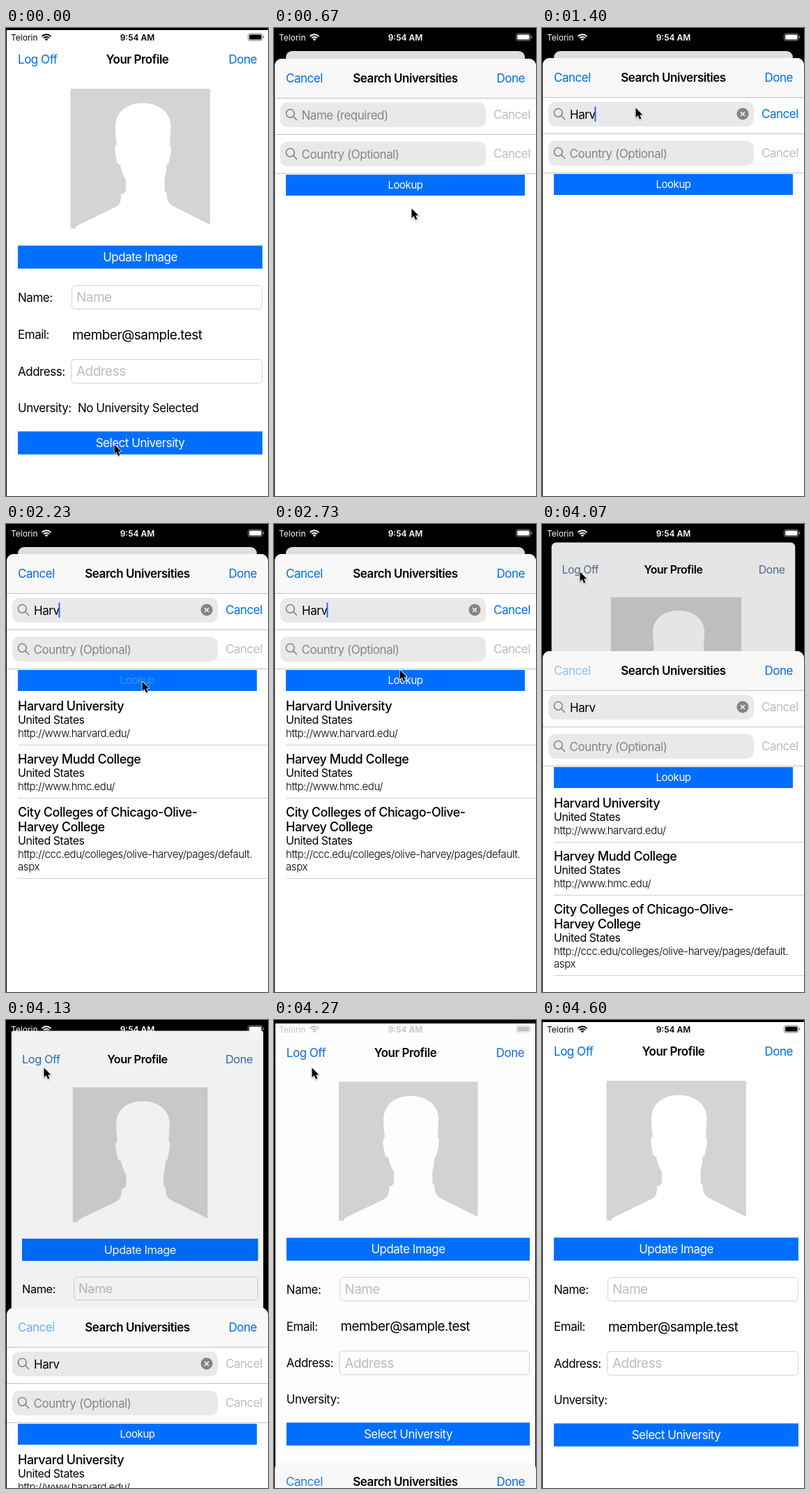
Animation of 376x670 px, one loop 4830 ms. Source, as an HTML page with a canvas:

```html
<!DOCTYPE html>
<html lang="en">
<head>
<meta charset="utf-8">
<title>University search</title>
<style>
  html, body { margin: 0; width: 100%; height: 100%; overflow: hidden; background: #000; }
  canvas { display: block; width: 376px; height: 670px; }
</style>
</head>
<body>
<canvas id="stage"></canvas>
<script>
const W = 376, H = 670, LOOP = 4830;
const FONT = 'Inter, Roboto, sans-serif';
const BLUE = '#006fff', LINK = '#006ce6', HINT = '#85858a', OFF = '#bcbcbe';

const canvas = document.getElementById('stage');
const ctx = canvas.getContext('2d');
const dpr = window.devicePixelRatio || 1;
canvas.width = W * dpr;
canvas.height = H * dpr;

const clamp = v => Math.max(0, Math.min(1, v));
const ramp = (t, a, b) => clamp((t - a) / (b - a));
const smooth = v => v * v * (3 - 2 * v);
const mix = (a, b, k) => a + (b - a) * k;

// Critically damped spring, 0 to 1
function spring(ms) {
  const u = Math.max(0, ms) * 0.01826;
  return 1 - (1 + u) * Math.exp(-u);
}

// y is the middle of the capital letters
function text(str, x, y, { size = 17, weight = 400, color = '#000', align = 'left', track = -0.028, alpha = 1 } = {}) {
  ctx.save();
  ctx.font = `${weight} ${size}px ${FONT}`;
  ctx.letterSpacing = `${track * size}px`;
  ctx.textAlign = align;
  ctx.fillStyle = color;
  ctx.globalAlpha *= alpha;
  ctx.fillText(str, x, y + size * 0.364);
  const width = ctx.measureText(str).width;
  ctx.restore();
  return width;
}

function box(x, y, w, h, color) {
  ctx.fillStyle = color;
  ctx.fillRect(x, y, w, h);
}

function rounded(x, y, w, h, r) {
  ctx.beginPath();
  ctx.roundRect(x, y, w, h, r);
}

function button(label, x, y, w, h, size, alpha = 1) {
  box(x, y, w, h, BLUE);
  text(label, x + w / 2, y + h / 2, { size, color: '#fff', align: 'center', alpha });
}

function input(hint, x, y, w, h) {
  rounded(x + 0.5, y + 0.5, w - 1, h - 1, 5);
  ctx.lineWidth = 1;
  ctx.strokeStyle = '#d2d2d2';
  ctx.stroke();
  text(hint, 101, y + h / 2, { size: 19, color: '#bdbdc0' });
}

function portrait() {
  box(92.5, 87, 200.5, 200, '#d4d4d4');
  ctx.fillStyle = '#fff';
  ctx.beginPath();
  ctx.moveTo(99, 287.5);
  ctx.quadraticCurveTo(100, 284, 106, 281);
  ctx.lineTo(158, 256);
  ctx.quadraticCurveTo(166, 252, 165, 238);
  ctx.quadraticCurveTo(172, 237, 172, 231);
  ctx.lineTo(172, 217);
  ctx.quadraticCurveTo(166, 207, 164, 196);
  ctx.quadraticCurveTo(159, 196, 158, 186);
  ctx.quadraticCurveTo(154, 169, 159, 167);
  ctx.quadraticCurveTo(157, 152, 157, 140);
  ctx.bezierCurveTo(158, 120, 173, 107.5, 197, 107.5);
  ctx.bezierCurveTo(221, 107.5, 236, 122, 236.5, 140);
  ctx.lineTo(235, 167);
  ctx.quadraticCurveTo(239, 169, 235, 186);
  ctx.quadraticCurveTo(234, 195, 230.5, 196);
  ctx.quadraticCurveTo(230, 208, 227.5, 216);
  ctx.lineTo(227.5, 233);
  ctx.quadraticCurveTo(231.5, 236, 231, 243);
  ctx.quadraticCurveTo(232, 251, 240, 255);
  ctx.lineTo(293.5, 282);
  ctx.lineTo(293.5, 287.5);
  ctx.fill();
}

function profile(depth, university) {
  ctx.save();
  const s = (375 - 32 * depth) / 375;
  ctx.translate(1 + 16 * depth, 3 + 30 * depth);
  ctx.scale(s, s);
  ctx.translate(-1, -3);
  rounded(1, 3, 375, 700, 10 * depth);
  ctx.clip();
  box(1, 3, 375, 700, '#fff');

  // Links lose their tint while the card is behind the sheet
  const color = `rgb(${mix(0, 119, depth)},${mix(108, 119, depth)},${mix(230, 124, depth)})`;
  text('Log Off', 17, 45, { color });
  text('Your Profile', 188.5, 45, { weight: 600, align: 'center' });
  text('Done', 360, 45, { color, align: 'right' });
  portrait();
  button('Update Image', 17, 311.5, 351, 33);
  text('Name:', 17, 386);
  input('Name', 94, 368, 274, 35);
  text('Email:', 17, 439);
  text('member@sample.test', 95, 439, { size: 19 });
  text('Address:', 17, 492);
  input('Address', 93, 474, 275, 35);
  text('Unversity:', 17, 543.5);
  text(university, 103, 543.5);
  button('Select University', 17, 577.5, 351, 33);

  box(1, 3, 375, 700, `rgba(0,0,0,${0.13 * depth})`);
  ctx.restore();
}

function statusBar(color) {
  text('Telorin', 7, 13.5, { size: 12, track: 0, color });
  text('9:54 AM', 188.5, 13.5, { size: 12, weight: 600, track: 0, color, align: 'center' });
  ctx.strokeStyle = ctx.fillStyle = color;
  ctx.lineWidth = 2;
  for (const r of [5.3, 8.7]) {
    ctx.beginPath();
    ctx.arc(58, 18, r, -Math.PI * 0.76, -Math.PI * 0.24);
    ctx.stroke();
  }
  ctx.beginPath();
  ctx.moveTo(58, 18.5);
  ctx.arc(58, 18, 3, -Math.PI * 0.76, -Math.PI * 0.24);
  ctx.fill();

  ctx.lineWidth = 1;
  ctx.globalAlpha = 0.5;
  rounded(347.5, 8, 20.5, 10, 2.7);
  ctx.stroke();
  rounded(369, 11.2, 1.4, 3.6, 0.7);
  ctx.fill();
  ctx.globalAlpha = 1;
  rounded(349, 9.5, 17.5, 7, 1.5);
  ctx.fill();
}

function clearMark(x, y) {
  ctx.fillStyle = '#838388';
  ctx.beginPath();
  ctx.arc(x, y, 8.5, 0, 7);
  ctx.fill();
  ctx.strokeStyle = '#fff';
  ctx.lineWidth = 1.5;
  ctx.beginPath();
  for (const d of [-3, 3]) {
    ctx.moveTo(x - 3, y - d);
    ctx.lineTo(x + 3, y + d);
  }
  ctx.stroke();
}

function searchBar(y, hint, { typed = '', focus = 0, caret = 0 } = {}) {
  rounded(9, y - 17.5, 295, 35.5, 10);
  ctx.fillStyle = '#e9e9ea';
  ctx.fill();
  ctx.strokeStyle = '#77777c';
  ctx.lineWidth = 1.4;
  ctx.beginPath();
  ctx.arc(23.3, y - 1.7, 5.9, 0, Math.PI * 2);
  ctx.moveTo(27.6, y + 2.6);
  ctx.lineTo(33, y + 8);
  ctx.stroke();

  let end = 39;
  if (typed) {
    end += text(typed, 40, y + 0.5);
    clearMark(288, y);
  } else {
    text(hint, 39.5, y + 0.5, { color: HINT });
  }
  if (caret > 0) {
    ctx.globalAlpha = caret;
    box(end, y - 10.5, 2, 21.5, '#2f67e8');
    ctx.globalAlpha = 1;
  }
  text('Cancel', 315, y - 0.5, { color: OFF, alpha: 1 - focus });
  text('Cancel', 315, y - 0.5, { color: LINK, alpha: focus });
  box(1, y + 28, 375, 1, '#c2c2c4');
}

const results = [
  { y: 260, name: ['Harvard University'], url: ['http://www.harvard.edu/'] },
  { y: 336, name: ['Harvey Mudd College'], url: ['http://www.hmc.edu/'] },
  { y: 412, name: ['City Colleges of Chicago-Olive-', 'Harvey College'],
    url: ['http://ccc.edu/colleges/olive-harvey/pages/default.', 'aspx'] }
];

function resultRow({ y, name, url }) {
  name.forEach((line, i) => text(line, 17, y + 21 * i, { size: 18, weight: 500 }));
  y += 21 * (name.length - 1) + 20.5;
  text('United States', 17, y, { size: 16 });
  y += 19.5;
  url.forEach((line, i) => text(line, 17, y + 17.5 * i, { size: 15, weight: 300 }));
  y += 17.5 * (url.length - 1) + 16;
  box(17, Math.round(y), 359, 1, '#d0d0d2');
}

function typedAt(t) {
  return 'Harv'.slice(0, [900, 1100, 1170, 1400].filter(at => t >= at).length);
}

function sheet(t, depth) {
  ctx.save();
  ctx.translate(0, Math.round(627 * (1 - depth)));
  rounded(1, 43, 375, 700, [10, 10, 0, 0]);
  ctx.clip();
  box(1, 43, 375, 700, '#fff');
  box(1, 43, 375, 56, '#f8f8f8');
  box(1, 99, 375, 1, '#c2c2c4');

  const cancel = t < 3700 ? 1 : 0.2 + 0.8 * ramp(t, 3990, 4330);
  text('Cancel', 17, 71, { color: LINK, alpha: cancel });
  text('Search Universities', 188.5, 71, { weight: 600, align: 'center' });
  text('Done', 360, 71, { color: LINK, align: 'right' });

  const editing = t >= 870 && t < 4000;
  const blink = 1 - ramp(t, 2800, 2930) + ramp(t, 3170, 3330);
  searchBar(123, 'Name (required)', {
    typed: typedAt(t),
    focus: editing ? ramp(t, 860, 930) : 0,
    caret: editing ? blink : 0
  });
  searchBar(179, 'Country (Optional)');

  const lookup = t < 2100 ? 1 : 0.2 + 0.8 * ramp(t, 2220, 2600);
  button('Lookup', 17, 209, 343, 30, 15, lookup);
  if (t >= 2200) results.forEach(resultRow);
  ctx.restore();
}

// Pointer stops: time, x, y
const stops = [
  [0, 155, 596], [330, 155, 596], [670, 197, 258], [830, 190, 242], [870, 190, 242],
  [930, 134, 114], [1899, 134, 114], [1900, 195, 225], [2630, 195, 225],
  [3130, 55, 69], [3170, 55, 69], [3330, 54, 68], [4830, 54, 68]
];

function pointer(t) {
  const i = stops.findIndex(s => s[0] > t);
  const [t0, x0, y0] = stops[i - 1], [t1, x1, y1] = stops[i];
  const k = smooth(ramp(t, t0, t1));
  ctx.save();
  ctx.translate(mix(x0, x1, k), mix(y0, y1, k));
  ctx.beginPath();
  [[0.5, 0.5], [0.5, 14], [3.7, 11.2], [6, 16.6], [8.5, 15.5], [6.2, 10.4], [10.3, 10.2]]
    .forEach(([x, y]) => ctx.lineTo(x, y));
  ctx.closePath();
  ctx.lineJoin = 'round';
  ctx.lineWidth = 1.6;
  ctx.strokeStyle = '#fff';
  ctx.shadowColor = 'rgba(0,0,0,.35)';
  ctx.shadowBlur = 2 * dpr;
  ctx.shadowOffsetY = dpr;
  ctx.stroke();
  ctx.shadowColor = 'transparent';
  ctx.fillStyle = '#000';
  ctx.fill();
  ctx.restore();
}

function depthAt(t) {
  if (t < 330 || t >= 4600) return 0;
  return t < 4022.5 ? spring(t - 205) : 1 - spring(t - 4022.5);
}

function draw(t) {
  ctx.setTransform(dpr, 0, 0, dpr, 0, 0);
  box(0, 0, W, H, '#000');
  const depth = depthAt(t);
  const open = t >= 330 && t < 4600;
  profile(depth, t < 330 ? 'No University Selected' : '');
  const shade = open ? Math.round(255 * (1 - ramp(t, 4230, 4400))) : 0;
  statusBar(`rgb(${shade},${shade},${shade})`);
  if (open) sheet(t, depth);
  if (t < 4400) pointer(t);
}

const start = performance.now();
function tick() {
  draw((performance.now() - start) % LOOP);
  requestAnimationFrame(tick);
}
tick();
</script>
</body>
</html>
```
